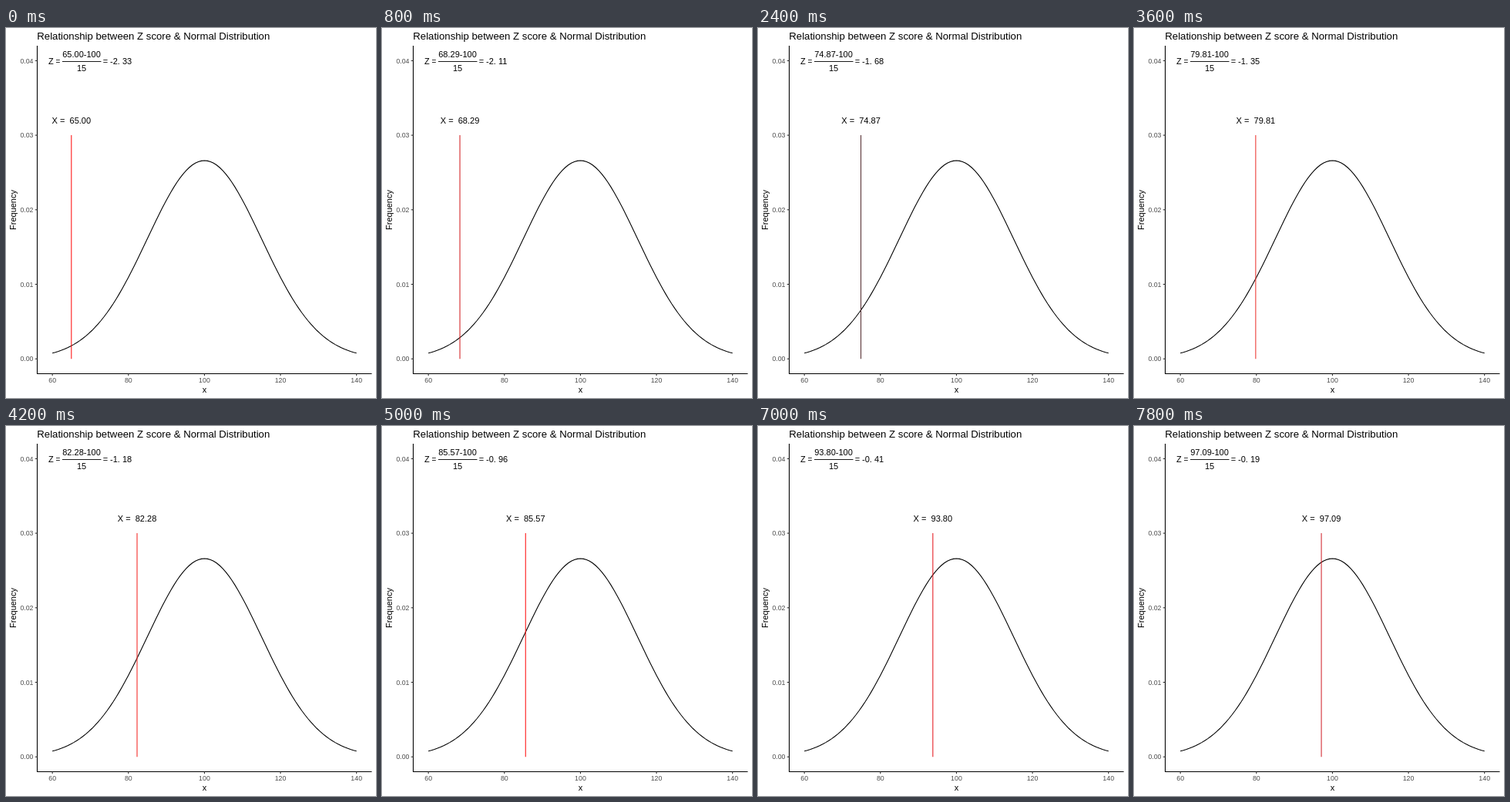
An HTML page with a canvas that plays this animation: 480x480 px, repeating every 8000 ms.

```html
<!DOCTYPE html>
<html lang="en">
<head>
<meta charset="utf-8">
<title>Z score</title>
<style>
html, body { margin: 0; width: 100%; height: 100%; overflow: hidden; background: #fff; }
canvas { display: block; width: 480px; height: 480px; }
</style>
</head>
<body>
<canvas id="plot" width="480" height="480"></canvas>
<script>
const ctx = document.getElementById('plot').getContext('2d');
const MEAN = 100, SD = 15, STEP_MS = 200, STEPS = 40;

const px = x => 60.15 + (x - 60) * 4.932;
const py = y => 429.2 - y * 9670;
const density = x => Math.exp(-(((x - MEAN) / SD) ** 2) / 2) / (SD * Math.sqrt(2 * Math.PI));

// The marker's red dulls and recovers: [step, r, g, b]
const TINTS = [
  [0, 255, 20, 20], [7, 178, 48, 52], [12, 88, 50, 54], [18, 236, 55, 50],
  [25, 255, 20, 20], [30, 255, 10, 15], [39, 210, 40, 48]
];

function tint(step) {
  const i = Math.max(1, TINTS.findIndex(key => key[0] >= step));
  const [a, b] = [TINTS[i - 1], TINTS[i]];
  const mix = (step - a[0]) / (b[0] - a[0]);
  const [r, g, bl] = [1, 2, 3].map(c => Math.round(a[c] + (b[c] - a[c]) * mix));
  return `rgb(${r},${g},${bl})`;
}

function text(str, x, y, size = 11, align = 'left', color = '#000') {
  ctx.font = `${size}px "Liberation Sans", Arial, sans-serif`;
  ctx.textAlign = align;
  ctx.fillStyle = color;
  ctx.fillText(str, x, y);
}

function line(points, color = '#000', width = 1.07) {
  ctx.beginPath();
  points.forEach(([x, y]) => ctx.lineTo(x, y));
  ctx.strokeStyle = color;
  ctx.lineWidth = width;
  ctx.stroke();
}

function drawAxes() {
  text('Relationship between Z score & Normal Distribution', 40.3, 15, 13.2);
  line([[40.5, 23], [40.5, 448.5], [474.5, 448.5]]);
  for (let i = 0; i <= 4; i++) {
    const y = py(i / 100);
    line([[37.7, y], [40.4, y]], '#333');
    text((i / 100).toFixed(2), 35.5, y + 3.2, 8.8, 'right', '#4d4d4d');
  }
  for (let x = 60; x <= 140; x += 20) {
    line([[px(x), 448.5], [px(x), 451.2]], '#333');
    text(x, px(x), 460, 8.8, 'center', '#4d4d4d');
  }
  text('x', 257.4, 473, 11, 'center');
  ctx.save();
  ctx.translate(13.3, 236);
  ctx.rotate(-Math.PI / 2);
  text('Frequency', 0, 0, 11, 'center');
  ctx.restore();
}

function drawFormula(x) {
  const [whole, decimals] = ((x - MEAN) / SD).toFixed(2).split('.');
  text('Z', 55, 47);
  text('=', 64.4, 47, 10);
  text(`${x.toFixed(2)}-100`, 98, 38, 11, 'center');
  line([[73, 43.5], [123.5, 43.5]], '#000', 0.9);
  text('15', 98, 56, 11, 'center');
  text('=', 125.7, 47);
  text(`${whole}. ${decimals}`, 135, 47);
}

function draw(step) {
  const x = 65 + step * 65 / 79;
  ctx.fillStyle = '#fff';
  ctx.fillRect(0, 0, 480, 480);
  drawAxes();
  line(Array.from({ length: 101 }, (_, i) => {
    const v = 60 + i * 0.8;
    return [px(v), py(density(v))];
  }));
  line([[px(x), py(0)], [px(x), py(0.03)]], tint(step));
  text(`X =  ${x.toFixed(2)}`, px(x), 124, 11.04, 'center');
  drawFormula(x);
}

function tick() {
  draw(Math.floor(performance.now() / STEP_MS) % STEPS);
  requestAnimationFrame(tick);
}
tick();
</script>
</body>
</html>
```
